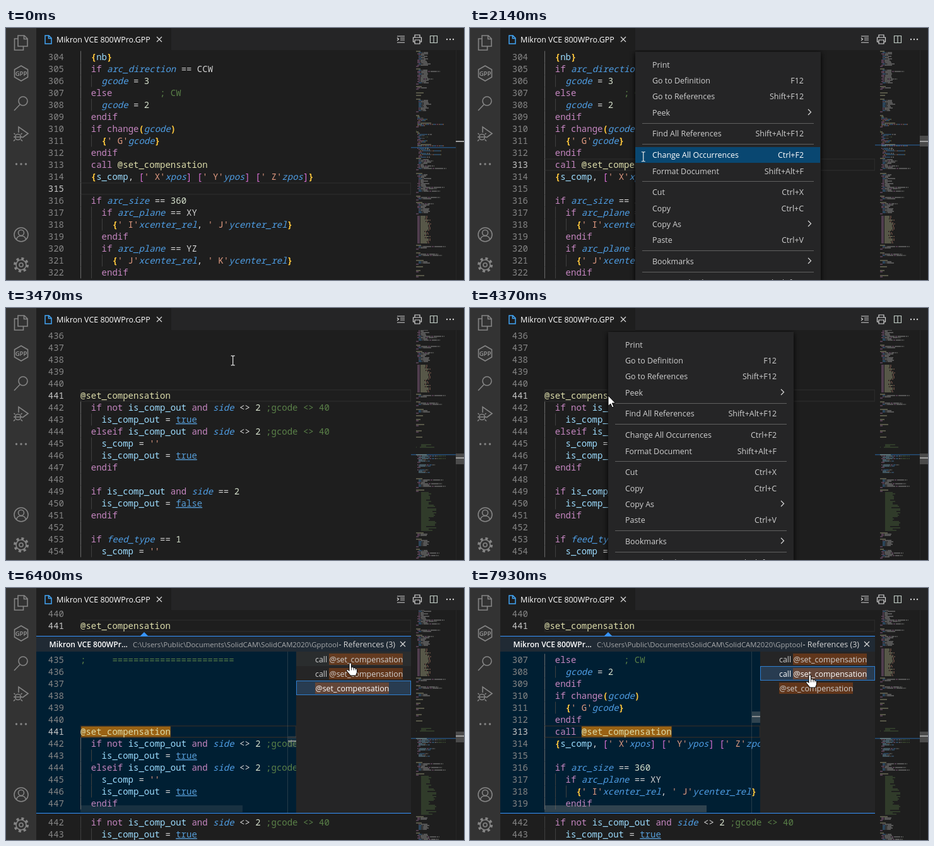
Write an HTML page that moves like this. It is 726 px wide and 400 px high and loops after 8 s.

```html
<!DOCTYPE html>
<html lang="en">
<head>
<meta charset="utf-8">
<title>Code editor</title>
<style>
html, body { margin: 0; width: 100%; height: 100%; overflow: hidden; background: #1e1e1e; }
svg { display: block; width: 726px; height: 400px; }
text { white-space: pre; font: 12.45px "Open Sans", "Noto Sans", sans-serif; fill: #d4d4d4; }
.code { font: 14px "Noto Sans Mono", "DejaVu Sans Mono", monospace; }
.menu { filter: drop-shadow(0 2px 4px #000); }
.line { fill: none; stroke: #858585; stroke-width: 1.6; }
.tool { fill: none; stroke: #d8d8d8; stroke-width: 1.2; }
</style>
</head>
<body>
<svg id="stage" viewBox="0 0 726 400"></svg>
<script>
const LOOP = 8000, CH = 8.4, ROW = 19, COL0 = 118;
const stage = document.getElementById('stage');

function el(tag, attrs, parent = stage) {
  const node = document.createElementNS('http://www.w3.org/2000/svg', tag);
  for (const k in attrs) node.setAttribute(k, attrs[k]);
  parent.appendChild(node);
  return node;
}
const group = (parent, attrs = {}) => el('g', attrs, parent);
const rect = (p, x, y, width, height, fill, more) => el('rect', { x, y, width, height, fill, ...more }, p);
const path = (p, d, more) => el('path', { d, ...more }, p);
function label(p, x, y, str, more) {
  const node = el('text', { x, y, ...more }, p);
  node.textContent = str;
  return node;
}
const show = (node, on) => node.setAttribute('display', on ? 'inline' : 'none');
const move = (node, x, y) => node.setAttribute('transform', `translate(${x} ${y})`);

// ---- program text ----
const lines = {};
function program(first, src) {
  src.split('\n').forEach((s, i) => { lines[first + i] = s; });
}
program(289, `
@line
  {nb}
  gcode = 1
  if change(gcode)
    {' G'gcode}
  endif
  call @set_compensation
  {s_comp, [' X'xpos] [' Y'ypos] [' Z'zpos]}
  {[' F'feed]}
endp


;
@arc
  {nb}
  if arc_direction == CCW
    gcode = 3
  else         ; CW
    gcode = 2
  endif
  if change(gcode)
    {' G'gcode}
  endif
  call @set_compensation
  {s_comp, [' X'xpos] [' Y'ypos] [' Z'zpos]}

  if arc_size == 360
    if arc_plane == XY
      {' I'xcenter_rel, ' J'ycenter_rel}
    endif
    if arc_plane == YZ
      {' J'xcenter_rel, ' K'ycenter_rel}
    endif
    if arc_plane == ZX`);
program(435, `;     =======================





@set_compensation
  if not is_comp_out and side <> 2 ;gcode <> 40
    is_comp_out = true
  elseif is_comp_out and side <> 2 ;gcode <> 40
    s_comp = ''
    is_comp_out = true
  endif

  if is_comp_out and side == 2
    is_comp_out = false
  endif

  if feed_type == 1
    s_comp = ''
    is_comp_out = true`);

const TOKEN = /(;.*)|('[^']*')|(@\w+)|\b(if|else|elseif|endif|endp|call|not|and|change)\b|\b(true|false)\b|\b(gcode|side|feed_type|feed|arc_\w+|[xyz]pos|[xy]center_rel)\b|\b(s_comp|is_comp_out|nb)\b|([{}()])|([[\]])|(\d+)/g;
const PLAIN = '#d4d4d4';
const INK = [PLAIN, '#5a8048', '#e09a80', '#dcdcaa', '#c586c0', '#569cd6', '#4f9fe6', '#9cdcfe', '#ffc83d', '#da70d6', '#d5e0cc'];

function tokens(str) {
  const out = [];
  let at = 0;
  for (const m of str.matchAll(TOKEN)) {
    if (m.index > at) out.push([str.slice(at, m.index), 0]);
    out.push([m[0], m.findIndex((g, i) => i && g !== undefined)]);
    at = m.index + m[0].length;
  }
  if (at < str.length) out.push([str.slice(at), 0]);
  return out;
}
const indentOf = s => s.search(/\S/);
function guideDepth(n) {
  if (lines[n].trim()) return indentOf(lines[n]);
  let a = n, b = n;
  while (lines[a] !== undefined && !lines[a].trim()) a--;
  while (lines[b] !== undefined && !lines[b].trim()) b++;
  return Math.min(indentOf(lines[a] || 'x'), indentOf(lines[b] || 'x'));
}

// Lines first..last; the first is centred on y.
function codeView(parent, first, last, y, active, right) {
  const g = group(parent);
  for (let n = first; n <= last; n++) {
    const mid = y + (n - first) * ROW;
    if (n === active) {
      rect(g, COL0 + .5, mid - 9, right - COL0 - 1, 18, 'none', { stroke: '#2a2a2a', 'stroke-width': 1.5 });
    }
    for (let c = 0; c < guideDepth(n); c += 2) {
      rect(g, Math.round(COL0 + c * CH), mid - 9.5, 1, ROW, c || !active ? '#404040' : '#6a6a6a');
    }
    label(g, 92, mid + 5, n, { class: 'code', 'text-anchor': 'end', style: `fill:${n === active ? '#c6c6c6' : '#858585'}` });
    const t = el('text', { x: COL0, y: mid + 5, class: 'code' }, g);
    for (const [s, kind] of tokens(lines[n])) {
      const style = `fill:${INK[kind]}` + (kind === 6 ? ';font-style:italic' : '') +
        (kind === 5 ? ';text-decoration:underline' : '') + (kind === 8 ? ';font-weight:600' : '');
      el('tspan', { style }, t).textContent = s;
    }
  }
  return g;
}

rect(stage, 0, 0, 726, 400, '#1e1e1e');
const viewArc = codeView(stage, 304, 322, 46, 315, 642);
const viewCall = codeView(stage, 304, 322, 46, 313, 642);
const viewDef = codeView(stage, 436, 454, 44, 441, 642);
const viewPeek = group(stage);
codeView(viewPeek, 440, 441, 41, 441, 642);
codeView(viewPeek, 442, 443, 372, 0, 642);

// ---- minimap: two pixels a line, one pixel a character ----
rect(stage, 642, 35, 84, 365, '#1e1e1e');
const mapLine = rect(stage, 642, 0, 71, 1.5, '#264f78');
const map = group(stage, { opacity: .6 });
const strokes = INK.map(() => '');
function mapText(n, str) {
  let x = 650;
  for (const [s, kind] of tokens(str)) {
    for (const w of s.matchAll(/\S+/g)) strokes[kind] += `M${x + w.index} ${2 * n - 441}h${w[0].length}`;
    x += s.length;
  }
}
let seed = 7;
const rnd = k => (seed = (seed * 16807) % 2147483647) % k;
// first line, last line, kind: 0 code, 1 list of calls, 2 comment
const BLOCKS = [
  [239, 251, 0], [253, 265, 0], [267, 269, 0], [272, 272, 0], [274, 274, 0], [277, 287, 0], [324, 333, 0],
  [336, 351, 0], [354, 357, 0], [359, 368, 0], [370, 391, 1], [393, 396, 0], [399, 402, 0], [405, 408, 0],
  [410, 410, 0], [413, 414, 0], [417, 418, 0], [422, 423, 0], [427, 427, 0], [433, 434, 2], [460, 467, 0],
  [469, 470, 0], [471, 501, 2], [503, 506, 0], [508, 514, 0], [516, 523, 0]
];
for (const [a, b, kind] of BLOCKS) {
  for (let n = a; n <= b; n++) {
    const word = 'x'.repeat(5 + rnd(9));
    let s = ['  call ', '    if ', '    side = ', '  endif ', '    gcode = '][rnd(5)] + word;
    if (rnd(5) === 0) s += ' and ' + word + ' == 2';
    if (kind === 1) s = "  call @" + word + " ''";
    if (kind === 2) s = '        ;' + word + word.slice(3);
    if (!kind && n === a) s = '@' + word;
    if (!kind && n === b && b > a) s = 'endp';
    mapText(n, s);
  }
}
for (const n in lines) mapText(+n, lines[n]);
strokes.forEach((d, i) => d && path(map, d, { stroke: INK[i], 'stroke-width': 1.2, fill: 'none' }));
rect(stage, 713, 35, 1, 365, '#262626');
const slider = rect(stage, 713, 0, 13, 17, '#797979', { opacity: .5 });
const mark = rect(stage, 713, 0, 13, 2, '#a0a0a0');

// ---- hover box ----
const tip = group(stage);
rect(tip, 177.5, 181.5, 252, 25, '#252526', { stroke: '#454545' });
label(tip, 186, 199, '@set_compensation', { class: 'code', style: 'fill:#dcdcaa' });

// ---- peek panel ----
const peek = group(stage);
rect(peek, 48, 76, 594, 282, '#202a34');
path(peek, 'M212 77L219 70L226 77z', { fill: '#3794ff' });
label(peek, 68.5, 94, 'Mikron VCE 800WPr...', { style: 'fill:#fff;font-weight:600;font-size:12.1px' });
label(peek, 201, 94, 'C:\\Users\\Public\\Documents\\SolidCAM\\SolidCAM2020\\Gpptool', { style: 'fill:#a6a8aa;font-size:11.3px' });
label(peek, 527.5, 94, '- References (3)', { style: 'font-size:12.5px' });
path(peek, 'M625 85l8 8m0-8l-8 8', { class: 'tool' });
rect(peek, 48, 101, 412, 256, '#001f33');
rect(peek, 460, 101, 182, 256, '#252526');

const clip = el('clipPath', { id: 'pane' }, el('defs', {}));
rect(clip, 48, 101, 412, 256, '#000');
const pane = group(peek, { 'clip-path': 'url(#pane)' });
function preview(first, active, col, barY, barAlpha) {
  const g = group(pane);
  rect(g, COL0 + col * CH, 219, 17 * CH, 19, '#996214');
  codeView(g, first, first + 12, 114, active, 460);
  rect(g, 446, 101, 1, 256, '#7f7f7f', { opacity: .3 });
  const bars = group(g, { opacity: barAlpha });
  rect(bars, 447, barY, 13, 18, '#797979');
  rect(bars, 118, 345, 257, 11, '#797979');
  rect(g, 447, barY + 7, 13, 2, '#a0a0a0', { opacity: .8 });
  return g;
}
const previews = [preview(290, 296, 7, 194, .4), preview(307, 313, 7, 196, .4), preview(435, 441, 0, 235, .2)];

const hoverRow = rect(peek, 460, 0, 182, 23, '#2a2d2e');
const pickRow = rect(peek, 460.5, 0, 181, 22, '#283c51', { stroke: '#2f7fd0' });
const results = [113, 136, 159].map((mid, i) => {
  const x = i < 2 ? 512.5 : 490.5;
  rect(peek, Math.floor(x), mid - 9, 117, 18, '#ea5c00', { opacity: .3 });
  const parts = [label(peek, x, mid + 5, '@set_compensation')];
  if (i < 2) parts.push(label(peek, 490, mid + 5, 'call'));
  return parts;
});
rect(peek, 48, 76, 594, 1, '#3794ff');
rect(peek, 48, 357, 594, 1, '#3794ff');

// ---- context menu ----
const ITEMS = [
  [58, 'Print', ''], [83, 'Go to Definition', 'F12'], [108, 'Go to References', 'Shift+F12'], [134, 'Peek', '>'],
  [167, 'Find All References', 'Shift+Alt+F12'], [201, 'Change All Occurrences', 'Ctrl+F2'],
  [227, 'Format Document', 'Shift+Alt+F'], [260, 'Cut', 'Ctrl+X'], [286, 'Copy', 'Ctrl+C'], [311, 'Copy As', '>'],
  [336, 'Paste', 'Ctrl+V'], [370, 'Bookmarks', '>'], [404, 'Command Palette...', 'Ctrl+Shift+P']
];
const menu = group(stage, { class: 'menu' });
rect(menu, 0, 38, 294, 380, '#252526');
const menuRow = rect(menu, 0, 0, 293, 25, '#094771');
for (const y of [151, 184, 243, 353, 387]) rect(menu, 11, y, 272, 1, '#606060');
const texts = ITEMS.map(([mid, name, key]) => {
  const parts = [label(menu, 27, mid + 5, name)];
  if (key === '>') path(menu, `M274 ${mid - 5}l4.5 4.5l-4.5 4.5`, { class: 'tool' });
  else parts.push(label(menu, 267, mid + 5, key, { 'text-anchor': 'end' }));
  return parts;
});
const sub = group(menu, { class: 'menu' });
rect(sub, 10, 127, 238, 61, '#252526');
label(sub, 37, 149, 'Peek Definition');
label(sub, 221, 149, 'Alt+F12', { 'text-anchor': 'end' });
label(sub, 37, 174, 'Peek References');

// ---- tab bar ----
rect(stage, 48, 0, 678, 35, '#252526');
rect(stage, 48, 0, 214, 36, '#1e1e1e');
path(stage, 'M62 12h6l4 4v9h-10zM67.5 12v4.5h4.5', { fill: 'none', stroke: '#42a5f5', 'stroke-width': 1.5 });
label(stage, 80, 23, 'Mikron VCE 800WPro.GPP', { style: 'fill:#fff' });
path(stage, 'M239 14l8 8m0-8l-8 8', { class: 'tool' });
path(stage, 'M620 13h12M625 16h7M625 19h7M620 23h12M620 15.5l2.5 2.2l-2.5 2.2', { class: 'tool' });
path(stage, 'M648 15v-4h8v4M648 22h-2.5v-7h13v7h-2.5M648 19h8v6h-8z', { class: 'tool', 'stroke-width': 1.5 });
path(stage, 'M672.5 12.5h11v11h-11zM678 12v12', { class: 'tool', style: 'stroke:#c0ccc4' });
for (const x of [699, 704, 709]) el('circle', { cx: x, cy: 18, r: 1.2, fill: '#d0d0d0' });

// ---- activity bar ----
rect(stage, 0, 0, 48, 400, '#333');
const icon = d => path(stage, d, { class: 'line' });
const ring = (cx, cy, r, more) => el('circle', { cx, cy, r, class: 'line', ...more });
icon('M19 12h10l5 5v12h-15zM28.5 12v5.5h5.5M19 17h-5.5v18h14v-6');
icon('M24 60l10.5 6v12l-10.5 6l-10.5-6v-12z');
label(stage, 24, 76, 'GPP', { 'text-anchor': 'middle', style: 'fill:#9a9a9a;font-size:9.5px;font-weight:600' });
ring(27, 116, 7);
icon('M22 121.500L13 131');
icon('M20 166V157L35 167.500L26 174');
ring(19, 173, 4.5);
icon('M14.500 173h9M14.500 169l-2-2M23.500 169l2-2M14.500 177l-2.500 2.500M23.500 177l2.500 2.500M12 173h2M24 173h2');
for (const x of [16.5, 24, 31.5]) el('circle', { cx: x, cy: 216, r: 1.7, fill: '#858585' });
ring(24, 328, 11);
ring(24, 325, 4.5);
icon('M16.500 336c1-8 14-8 15 0');
ring(24, 376, 8);
ring(24, 376, 3);
ring(24, 376, 10, { 'stroke-dasharray': '3.9 3.954', style: 'stroke-width:4' });

// ---- pointer ----
const click = el('circle', { r: 10.5, fill: '#d03a3a', opacity: .7 });
const beam = path(stage, 'M-3 -7.500h2l1 1l1-1h2M0 -6.500V6.500M-3 7.500h2l1-1l1 1h2', { stroke: '#e8e8e8', fill: 'none', 'stroke-width': 1.2 });
const arrow = path(stage, 'M0 0V16.500L3.800 13L6.500 19L9 18L6.400 12H11.500Z', { fill: '#fff', stroke: '#000' });
const hand = group(stage);
path(hand, 'M-2 1.500C-2-.5 1.500-.5 1.500 1.500V7.500C3 6 5 6.500 5 8C6.500 7 8 7.500 8 9C9.500 8.500 10.500 9.500 10.500 11V15L8.500 20H0L-6 12.500C-6.500 10.500-4.500 9.500-2 12.500Z', { fill: '#fff', stroke: '#000' });
path(hand, 'M1.500 7.500v4M5 8v3.500M8 9v2.500', { stroke: '#000', fill: 'none', 'stroke-width': .8 });

// start, end, steps, target
const MOVES = [
  [500, 900, 6, 263, 219], [1980, 2710, 10, 376, 77], [3310, 4040, 10, 219, 139], [4620, 5340, 10, 302, 110],
  [5760, 6400, 9, 546, 119], [6720, 7120, 6, 544, 137], [7450, 7930, 7, 539, 138]
];
function pointer(t) {
  let x = 366, y = 333;
  for (const [a, b, n, tx, ty] of MOVES) {
    if (t < a) break;
    const k = Math.min(1, (Math.floor((t - a) * (n - 1) / (b - a) + 1e-6) + 1) / n);
    const e = k * k * (3 - 2 * k);
    x += (tx - x) * e;
    y += (ty - y) * e;
  }
  return [x, y];
}
const within = (t, ...spans) => spans.some(([a, b]) => t >= a && t < b);
const tint = (parts, on) => parts.forEach(p => { p.style.fill = on ? '#fff' : '#d0d0d0'; });

function draw(t) {
  const [x, y] = pointer(t);
  const scene = t < 1730 ? 0 : t < 2960 ? 1 : t < 5510 ? 2 : 3;
  [viewArc, viewCall, viewDef, viewPeek].forEach((v, i) => show(v, i === scene));

  move(map, 0, [0, 0, -208, -202][scene]);
  mapLine.setAttribute('y', [189, 185, 232, 238][scene]);
  mark.setAttribute('y', [179, 179, 237, 234][scene]);
  slider.setAttribute('y', [171, 171, 231, 228][scene]);
  show(slider, t >= 500);
  show(tip, within(t, [1230, 1400]));

  const open = within(t, [1730, 2960], [4290, 5510]);
  show(menu, open);
  if (open) {
    move(menu, scene === 1 ? 262 : 219, 0);
    const hot = within(t, [1980, 2960], [4620, 5510]) ? ITEMS.findIndex(i => Math.abs(i[0] - y) <= 12.7) : -1;
    show(menuRow, hot >= 0);
    if (hot >= 0) menuRow.setAttribute('y', ITEMS[hot][0] - 12);
    texts.forEach((p, i) => tint(p, i === hot));
    show(sub, t >= 4860);
  }

  show(peek, scene === 3);
  if (scene === 3) {
    const pick = t < 6640 ? 2 : t < 7370 ? 0 : 1;
    const shown = t < 6720 ? 2 : t < 7450 ? 0 : 1;
    previews.forEach((p, i) => show(p, i === shown && t >= 5590));
    results.forEach((p, i) => tint(p, i === pick));
    pickRow.setAttribute('y', 101.5 + pick * 23);
    const over = Math.floor((y - 101) / 23);
    show(hoverRow, x > 460 && over >= 0 && over < 3);
    hoverRow.setAttribute('y', 101 + over * 23);
  }

  const kind = within(t, [4040, 4620]) ? arrow : scene === 3 && x > 460 ? hand : beam;
  for (const c of [beam, arrow, hand]) {
    show(c, c === kind && t >= 80);
    move(c, x, y);
  }
  show(click, within(t, [1400, 1730], [4120, 4290], [6640, 6720], [7370, 7450]));
  move(click, x, y);
}

function tick(now) {
  draw(now % LOOP);
  requestAnimationFrame(tick);
}
draw(0);
requestAnimationFrame(tick);
</script>
</body>
</html>
```
